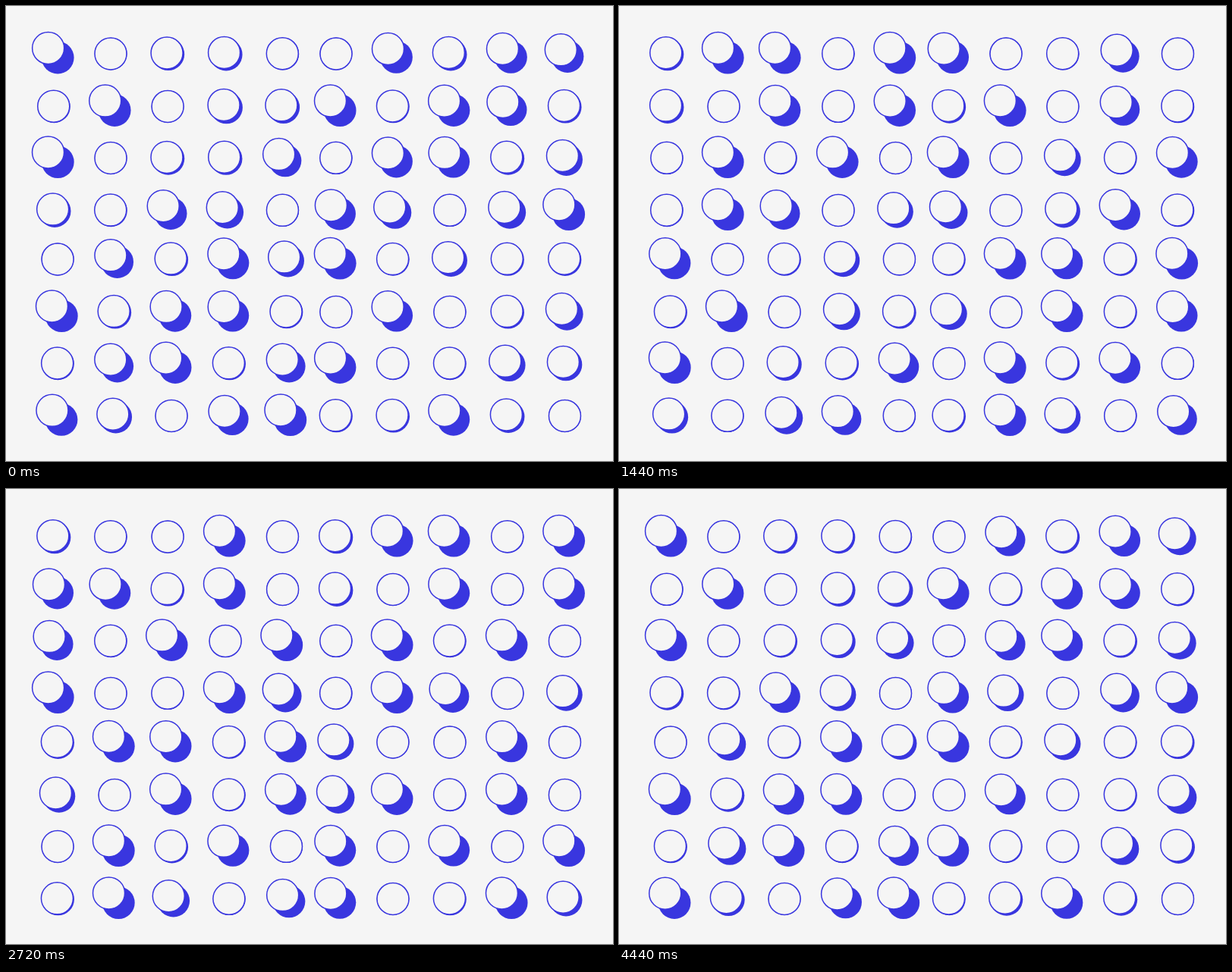
Recreate the animation shown at these times as an HTML page with a canvas. Size 800x600 px, loop 4.48 s.

```html
<!DOCTYPE html>
<html>
<head>
<meta charset="utf-8">
<style>
html, body { margin: 0; width: 100%; height: 100%; overflow: hidden; background: #f5f5f5; }
canvas { display: block; }
</style>
</head>
<body>
<canvas id="stage" width="800" height="600"></canvas>
<script>
const ctx = document.getElementById('stage').getContext('2d');
const PERIOD = 2240, STEP = 40;
const PAPER = '#f5f5f5', INK = '#3936df';

// One block of 5 by 4 discs, with the time in ms when each is widest apart
const colX = [0, 75, 150, 226, 301.5];
const rowY = [0, 69.5, 137.5, 206.5];
const peaks = [
  2080, 1310, 1565, 610, 1395,
  820, 190, 1170, 570, 1640,
  85, 1305, 660, 1610, 445,
  620, 1430, 1840, 485, 910
];

// The block appears four times, each copy with its own delay
const copies = [
  { x: 63.1, y: 63, delay: 0 },
  { x: 435, y: 63, delay: 1280 },
  { x: 68.1, y: 334, delay: 1365 },
  { x: 435, y: 334, delay: 122 }
];

// Cubic Bezier easing (.85, 0, .33, 1), solved by bisection
function ease(x) {
  let lo = 0, hi = 1, s = 0.5;
  for (let i = 0; i < 20; i++) {
    s = (lo + hi) / 2;
    const r = 1 - s;
    if (3 * s * r * r * 0.85 + 3 * s * s * r * 0.33 + s * s * s < x) lo = s;
    else hi = s;
  }
  return s * s * (3 - 2 * s);
}

// How far apart a disc is at a given age: 1 at its peak, 0 half a period away
function openness(age) {
  const phase = (age % PERIOD + PERIOD) % PERIOD;
  return ease(Math.abs(1 - 2 * phase / PERIOD));
}

function fillCircle(x, y, r, color) {
  ctx.fillStyle = color;
  ctx.beginPath();
  ctx.arc(x, y, r, 0, 2 * Math.PI);
  ctx.fill();
}

function drawDisc(x, y, open) {
  const drop = 5.2 * open, lift = 7.6 * open;
  fillCircle(x + drop, y + drop, 21.4, INK);
  fillCircle(x - lift, y - lift, 21, PAPER);
  ctx.stroke();
}

function draw(now) {
  const t = Math.floor(now / STEP) * STEP;
  ctx.fillStyle = PAPER;
  ctx.fillRect(0, 0, 800, 600);
  ctx.strokeStyle = INK;
  ctx.lineWidth = 1.5;
  for (const { x, y, delay } of copies) {
    peaks.forEach((peak, i) => {
      drawDisc(x + colX[i % 5], y + rowY[Math.floor(i / 5)], openness(t - delay - peak));
    });
  }
}

const start = performance.now();
function tick() {
  draw(performance.now() - start);
  requestAnimationFrame(tick);
}
tick();
</script>
</body>
</html>
```
